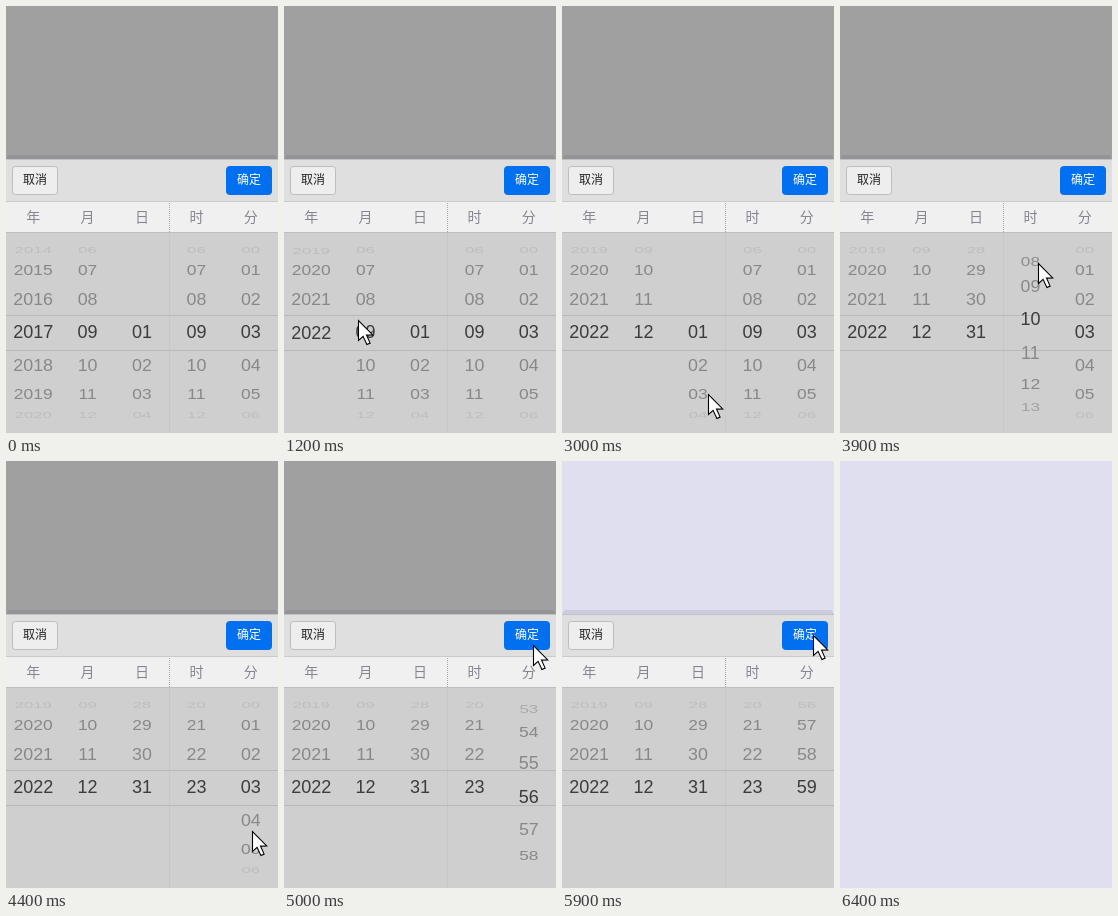
Write an HTML page with a canvas that moves like this. It is 272 px wide and 427 px high and loops after 7.6 s.

```html
<!DOCTYPE html>
<html lang="zh">
<head>
<meta charset="utf-8">
<title>日期时间选择器</title>
<style>
html, body { margin: 0; width: 100%; height: 100%; overflow: hidden; background: #e0dfef; }
canvas { display: block; width: 272px; height: 427px; }
</style>
</head>
<body>
<canvas id="stage"></canvas>
<script>
const W = 272, H = 427, LOOP = 7600, STEP = 100;
const RADIUS = 109, DEPTH = 600, ROW_ANGLE = Math.PI / 10, MID = 326;
const COLUMN = W / 5;
const CJK = '"Noto Sans CJK SC", "Noto Sans CJK", sans-serif';
const DIGITS = '"Liberation Sans", Arial, sans-serif';

const canvas = document.getElementById('stage');
const ctx = canvas.getContext('2d');
const dpr = window.devicePixelRatio || 1;
canvas.width = W * dpr;
canvas.height = H * dpr;

// Every flick ends at the wheel's last value; snap sets how early it gets there.
const wheels = [
  { label: '年', min: 2010, from: 2017, to: 2022, start: 700, end: 1300, snap: 8 },
  { label: '月', min: 1, from: 9, to: 12, start: 1400, end: 2500, snap: 8 },
  { label: '日', min: 1, from: 1, to: 31, start: 3000, end: 3700, snap: 12 },
  { label: '时', min: 0, from: 9, to: 23, start: 3700, end: 4400, snap: 4.43 },
  { label: '分', min: 0, from: 3, to: 59, start: 4500, end: 5400, snap: 15.1 }
];

// Turning points of the pointer tip.
const turns = [
  { t: 200, x: 108, y: 215 },
  { t: 400, x: 79, y: 278 },
  { t: 700, x: 32, y: 366 },
  { t: 1000, x: 31, y: 255 },
  { t: 1200, x: 74, y: 314 },
  { t: 1400, x: 76, y: 373 },
  { t: 1800, x: 78, y: 262 },
  { t: 2300, x: 122, y: 402 },
  { t: 3000, x: 146, y: 388 },
  { t: 3100, x: 165, y: 135 },
  { t: 3600, x: 198, y: 310 },
  { t: 3900, x: 198, y: 257 },
  { t: 4000, x: 238, y: 217 },
  { t: 4400, x: 246, y: 370 },
  { t: 5000, x: 249, y: 184 },
  { t: 5400, x: 251, y: 174 }
];

const clamp = (v, lo, hi) => Math.min(hi, Math.max(lo, v));
const progress = (t, a, b) => clamp((t - a) / (b - a), 0, 1);
const smooth = u => u * u * (3 - 2 * u);
const mix = (a, b, u) => a + (b - a) * u;
const flick = (u, snap) => 1 - Math.pow(1 - u ** 3, snap);

function pointerAt(t) {
  const i = turns.findIndex(p => p.t > t);
  if (i < 0) return turns[turns.length - 1];
  const a = turns[i - 1], b = turns[i];
  const u = smooth(progress(t, a.t, b.t));
  return { x: Math.round(mix(a.x, b.x, u)), y: Math.round(mix(a.y, b.y, u)) };
}

function rect(x, y, w, h, color) {
  ctx.fillStyle = color;
  ctx.fillRect(x, y, w, h);
}

function text(str, x, y, font, color) {
  ctx.font = font;
  ctx.fillStyle = color;
  ctx.textAlign = 'center';
  ctx.textBaseline = 'alphabetic';
  ctx.fillText(str, x, y);
}

function button(x, label, fill, border, color) {
  ctx.beginPath();
  ctx.roundRect(x + 0.5, 160.5, 45, 28, 3);
  ctx.fillStyle = fill;
  ctx.fill();
  ctx.strokeStyle = border;
  ctx.lineWidth = 1;
  ctx.stroke();
  text(label, x + 23, 178, '12px ' + CJK, color);
}

function drawWheel(wheel, cx, t) {
  const u = progress(t, wheel.start, wheel.end);
  const pos = mix(wheel.from, wheel.to, flick(u, wheel.snap));
  const first = Math.max(wheel.min, Math.ceil(pos - 4));
  const last = Math.min(wheel.to, Math.floor(pos + 4));
  for (let n = first; n <= last; n++) {
    const angle = (n - pos) * ROW_ANGLE;
    const scale = 1 / (1 + RADIUS * (1 - Math.cos(angle)) / DEPTH);
    const dy = RADIUS * Math.sin(angle) * scale;
    const active = Math.abs(angle) < ROW_ANGLE / 2;
    ctx.save();
    ctx.globalAlpha = clamp((86 - Math.abs(dy)) / 16, 0, 1);
    ctx.translate(cx, MID + dy);
    ctx.scale(scale, scale * Math.cos(angle));
    text(String(n).padStart(2, '0'), 0, 6.4, '18px ' + DIGITS, active ? '#3c3c3c' : '#888');
    ctx.restore();
  }
}

function drawPanel(t) {
  ctx.fillStyle = 'rgba(50,50,80,0.11)';
  ctx.beginPath();
  ctx.roundRect(1, 149, W - 2, 8, 3);
  ctx.fill();
  rect(0, 153, W, 42, '#dfdfdf');
  rect(0, 153, W, 1, '#c2c2c2');
  rect(0, 195, W, 1, '#cbcbcb');
  rect(0, 196, W, 30, '#f0f0f1');
  rect(0, 226, W, 201, '#cfcfcf');
  rect(0, 226, W, 1, '#bebebe');
  button(6, '取消', '#eeeeee', '#bdbdbd', '#222');
  button(220, '确定', '#006ff0', '#006ff0', '#fff');

  for (let y = 197; y < 226; y += 2) rect(163, y, 1, 1, '#a8a8a8');
  rect(163, 227, 1, 200, '#c7c7c7');
  rect(0, 309, W, 1, '#b9b9b9');
  rect(0, 344, W, 1, '#b9b9b9');

  wheels.forEach((wheel, i) => {
    const cx = (i + 0.5) * COLUMN;
    text(wheel.label, cx, 216, '14px ' + CJK, '#868690');
    drawWheel(wheel, cx, t);
  });
}

function drawPointer({ x, y }) {
  ctx.save();
  ctx.translate(x + 0.5, y + 0.5);
  const arrow = new Path2D('M0 0V20L4.6 15.8 8.4 24 11.6 22.6 8 14.6 14.2 14.4Z');
  ctx.fillStyle = '#fff';
  ctx.fill(arrow);
  ctx.strokeStyle = '#000';
  ctx.lineWidth = 1.1;
  ctx.stroke(arrow);
  ctx.restore();
}

function draw(t) {
  ctx.setTransform(dpr, 0, 0, dpr, 0, 0);
  rect(0, 0, W, H, '#e0dfef');
  if (t >= 6400) return;

  ctx.globalAlpha = 1 - progress(t, 5300, 5900);
  rect(0, 0, W, H, '#a0a0a0');
  ctx.globalAlpha = 1;

  ctx.save();
  if (t >= 6300) ctx.translate(0, 150);
  drawPanel(t);
  ctx.restore();

  if (t >= turns[0].t) drawPointer(pointerAt(t));
}

const start = performance.now();
function frame() {
  const t = (performance.now() - start) % LOOP;
  draw(Math.floor(t / STEP) * STEP);
  requestAnimationFrame(frame);
}
frame();
</script>
</body>
</html>
```
